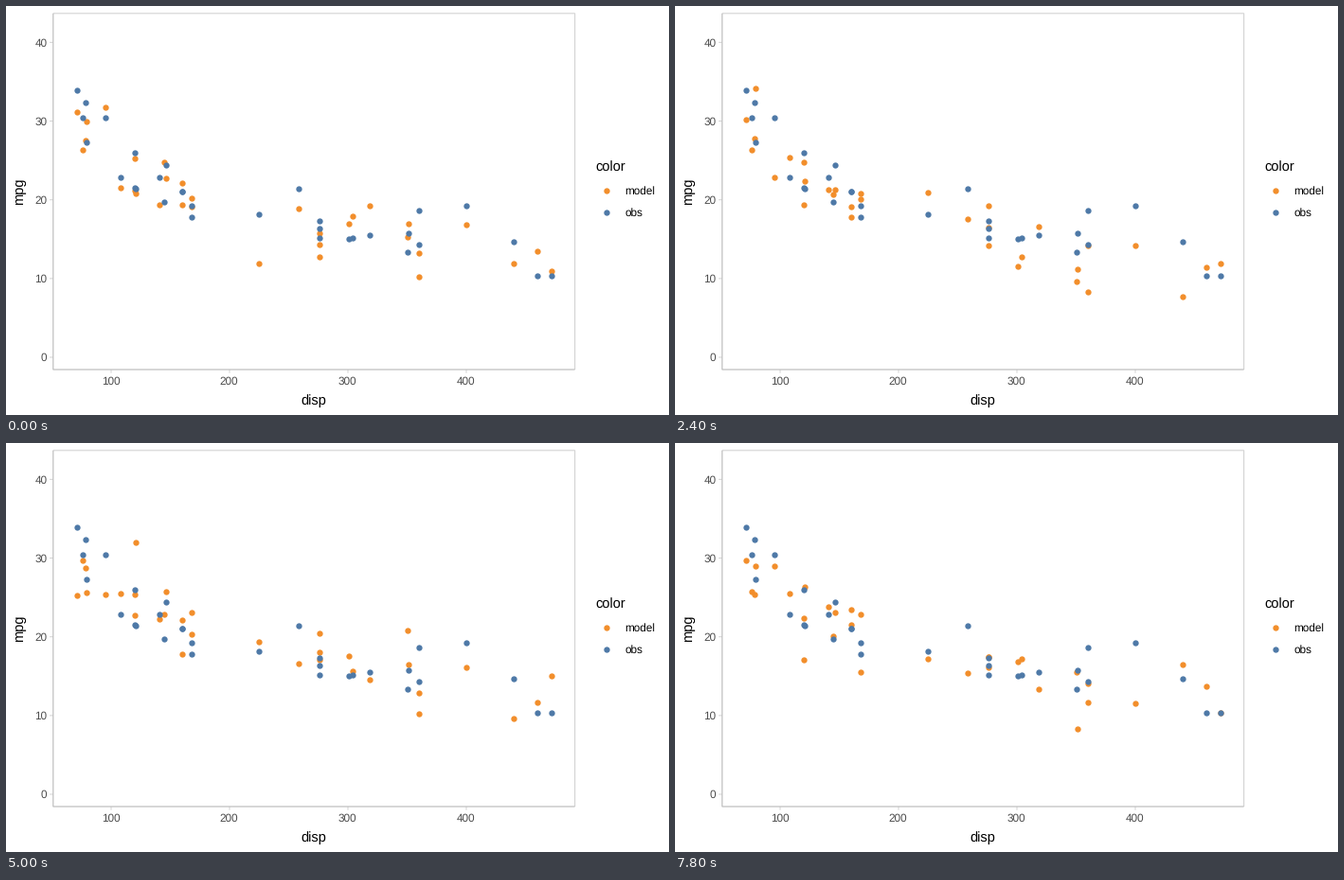
These frames come from a looping animation (700 px wide and 432 px high, 8 s). A matplotlib script:

```python
import numpy as np
import matplotlib.pyplot as plt
from matplotlib.animation import FuncAnimation

W, H, DPI = 700, 432, 96
FRAMES, STEP_MS = 40, 200
ORANGE, BLUE = "#f28e2b", "#4e79a7"
BORDER, AXIS, TICK_TEXT = "#d5d5d5", "#bebebe", "#4d4d4d"
LEFT, RIGHT, TOP, BOTTOM = 49.8, 600.6, 7.8, 384

plt.rcParams["font.family"] = "Liberation Sans"
plt.rcParams["text.hinting"] = "none"

# mtcars, ordered by displacement
disp = np.array([
    71.1, 75.7, 78.7, 79, 95.1, 108, 120.1, 120.3, 121, 140.8, 145, 146.7,
    160, 160, 167.6, 167.6, 225, 258, 275.8, 275.8, 275.8, 301, 304, 318,
    350, 351, 360, 360, 400, 440, 460, 472])
mpg = np.array([
    33.9, 30.4, 32.4, 27.3, 30.4, 22.8, 21.5, 26, 21.4, 22.8, 19.7, 24.4,
    21, 21, 19.2, 17.8, 18.1, 21.4, 16.4, 17.3, 15.2, 15, 15.2, 15.5,
    13.3, 15.8, 18.7, 14.3, 19.2, 14.7, 10.4, 10.4])


def px(d):
    return 1.25 * np.asarray(d) - 14


def py(m):
    return 371 - 8.315 * np.asarray(m)


def draw(frame):
    """One predictive draw from a log-linear model of mpg."""
    rng = np.random.default_rng(500 + frame)
    mean = 70 - 9.55 * np.log(disp)
    return np.clip(mean + rng.normal(0, 2.7, disp.size), 4.5, 35.4)


fig = plt.figure(figsize=(W / DPI, H / DPI), dpi=DPI, facecolor="white")
ax = fig.add_axes([0, 0, 1, 1])
ax.set_xlim(0, W)
ax.set_ylim(H, 0)
ax.axis("off")


def line(xs, ys, color, width=0.9):
    ax.plot(xs, ys, color=color, lw=width, solid_capstyle="butt",
            solid_joinstyle="miter", snap=False, zorder=1)


def label(x, y, text, size=8.8, color="black", ha="left", rotation=0):
    ax.text(x, y, text, size=size, color=color, ha=ha, va="baseline",
            rotation=rotation, rotation_mode="anchor")


def dots(x, y, color, z):
    return ax.scatter(x, y, s=22.5, c=color, linewidths=0, zorder=z)


for d in (100, 200, 300, 400):
    line([px(d)] * 2, [BOTTOM, BOTTOM + 3.7], BORDER, 0.8)
    label(px(d) - 0.3, 399.5, str(d), color=TICK_TEXT, ha="center")
for m in (0, 10, 20, 30, 40):
    line([LEFT - 3.7, LEFT], [py(m)] * 2, BORDER, 0.8)
    label(43.3, py(m) + 4.3, str(m), color=TICK_TEXT, ha="right")

line([LEFT, RIGHT, RIGHT], [TOP, TOP, BOTTOM], BORDER)
line([LEFT, LEFT, RIGHT], [TOP, BOTTOM, BOTTOM], AXIS)

label(325.3, 421.3, "disp", 11, ha="center")
label(18, 196, "mpg", 11, ha="center", rotation=90)

label(622.7, 174.8, "color", 11)
for y, name, color in ((194.5, "model", ORANGE), (217.6, "obs", BLUE)):
    dots([634.3], [y], color, 2)
    label(653, y + 4.3, name)

model = dots(px(disp), py(draw(0)), ORANGE, 2)
dots(px(disp), py(mpg), BLUE, 3)


def update(frame):
    model.set_offsets(np.column_stack([px(disp), py(draw(frame))]))
    return [model]


def init():
    return update(0)


anim = FuncAnimation(fig, update, frames=FRAMES, init_func=init,
                     interval=STEP_MS, repeat=True, repeat_delay=0)
plt.show()
```
